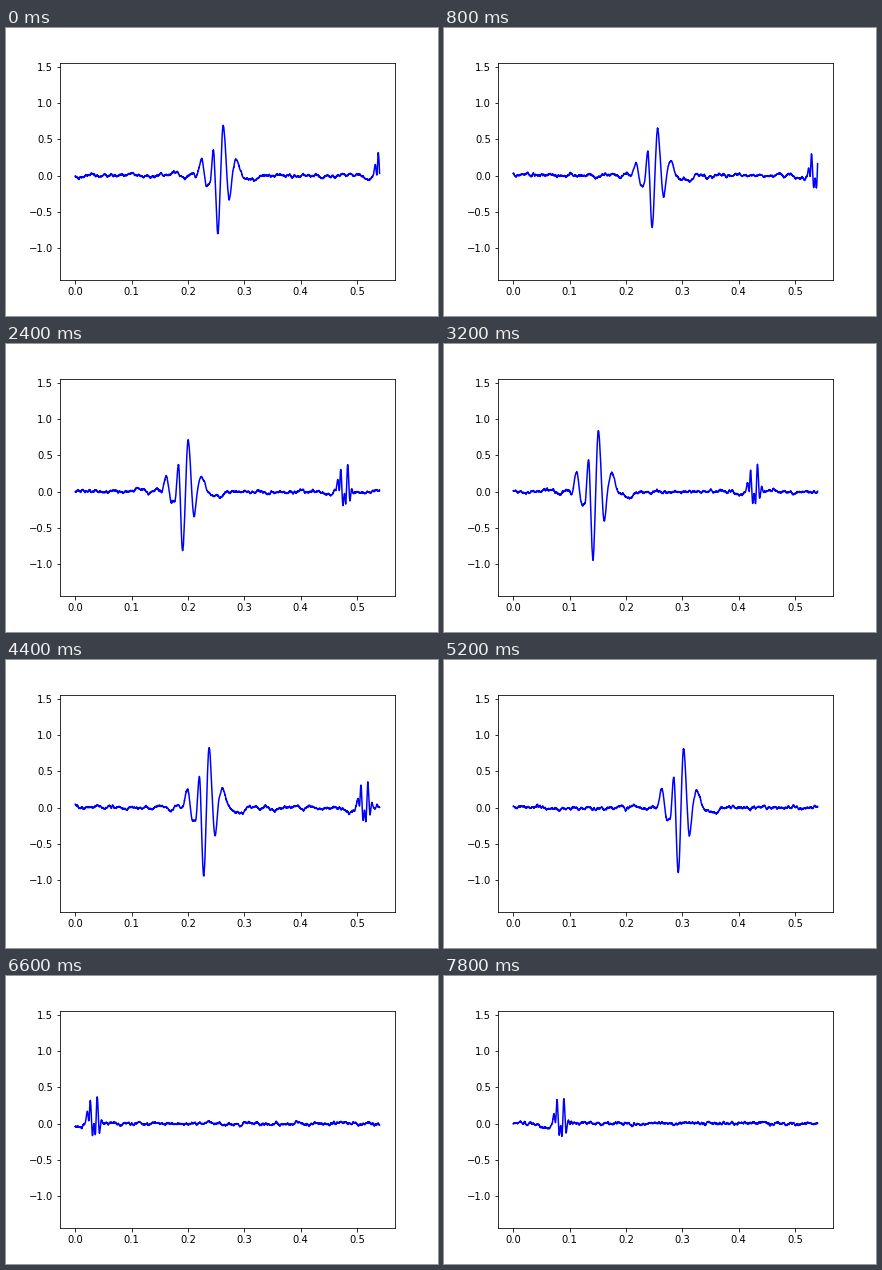
Write a matplotlib script that moves like this. It is 432 px wide and 288 px high and loops after 8000 ms.

```python
import matplotlib.pyplot as plt
import numpy as np
from matplotlib.animation import FuncAnimation

FRAMES, INTERVAL = 40, 200
SPAN = 0.54                  # seconds of sound in one window
RATE = 4000
STEP = int(SPAN * RATE)
rng = np.random.default_rng(11)

# Knots of the two heart sounds: time (ms) and height
S1_T = [-95, -75, -58, -47, -38, -29, -19.5, -14, -7.8,
        0, 9.5, 20, 27, 33, 44, 50, 66, 80]
S1_Y = [0, .04, -.03, .04, 0, .29, -.2, -.16, .48,
        -1.04, .93, -.43, .1, .29, 0, -.04, -.09, 0]
S2_T = [-50, -30, -21, -17.5, -14.8, -12.3, -8.3, -5.8, -3.5,
        0, 4, 7.5, 11]
S2_Y = [0, -.05, 0, .13, .01, .31, -.17, -.02, -.16,
        .37, -.11, .06, 0]


def smooth_curve(t, xs, ys):
    """Monotone cubic through the knots, zero outside them."""
    xs, ys = np.array(xs) / 1000, np.array(ys)
    h = np.diff(xs)
    d = np.diff(ys) / h
    m = np.zeros(len(xs))
    same = d[:-1] * d[1:] > 0
    a, b = d[:-1][same], d[1:][same]
    m[1:-1][same] = 2 * a * b / (a + b)
    i = np.clip(np.searchsorted(xs, t) - 1, 0, len(h) - 1)
    u = (t - xs[i]) / h[i]
    y = (ys[i] * (1 + 2 * u) * (1 - u) ** 2 + ys[i + 1] * u * u * (3 - 2 * u)
         + h[i] * u * (1 - u) * (m[i] * (1 - u) - m[i + 1] * u))
    return np.where((t >= xs[0]) & (t <= xs[-1]), y, 0)


def rumble(n, width, level):
    """Random noise blurred over `width` seconds."""
    k = np.arange(-4 * width, 4 * width, 1 / RATE)
    y = np.convolve(rng.normal(size=n), np.exp(-(k / width) ** 2), "same")
    return level * y / y.std()


def record():
    n = STEP * FRAMES + 1
    t = np.arange(n) / RATE
    y = rumble(n, .0015, .01) + rumble(n, .005, .01) + rng.normal(0, .004, n)

    # One beat every two windows, drifting slowly in time and loudness
    beats = np.arange(FRAMES // 2)
    offset = np.interp(beats, [0, 4, 8, 11, 14, 16, 19],
                       [.253, .240, .1415, .228, .325, .2885, .3395])
    loud = np.interp(beats, [0, 4, 8, 11, 16, 17, 18],
                     [.75, .63, .90, .90, .82, 1.28, .80])
    delay = .29 + .007 * np.exp(-beats / 6)
    for b in beats:
        since = t - 2 * b * SPAN - offset[b]
        y += loud[b] * smooth_curve(since, S1_T, S1_Y)
        y += smooth_curve(since - delay[b], S2_T, S2_Y)
    return y


sound = record()
fig, ax = plt.subplots(figsize=(6, 4), dpi=72)
fig.subplots_adjust(left=.125, right=.9, bottom=.125, top=.88)
ax.set_xlim(-.05 * SPAN, 1.05 * SPAN)
ax.set_ylim(-1.436, 1.556)
x = np.arange(STEP + 1) / RATE
line, = ax.plot(x, sound[:STEP + 1], color="blue", lw=1.5)


def draw(i):
    line.set_ydata(sound[i * STEP:(i + 1) * STEP + 1])
    return line,


anim = FuncAnimation(fig, draw, frames=FRAMES, interval=INTERVAL,
                     repeat=True, repeat_delay=0)
plt.show()
```
